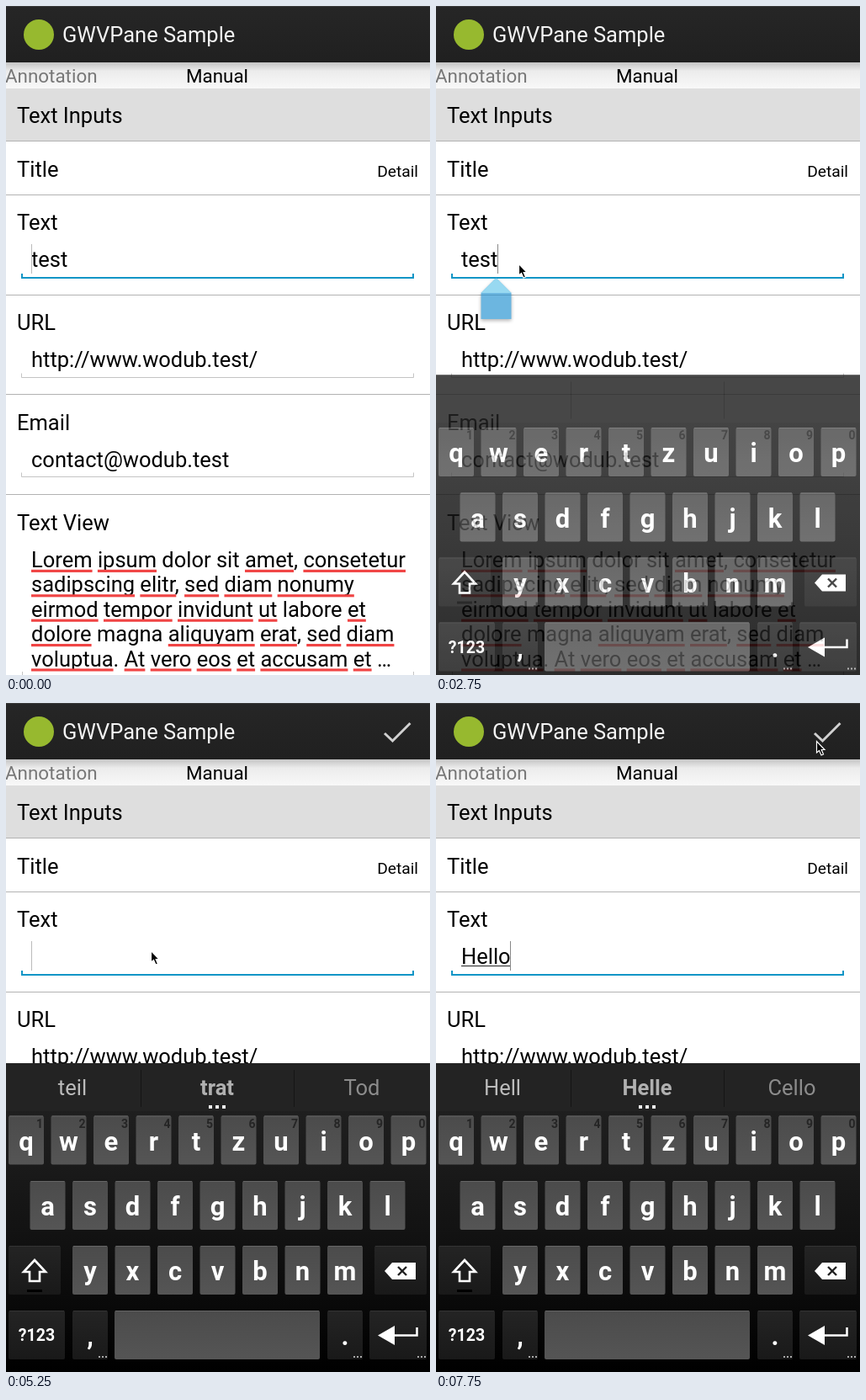
Animation of 504 by 795 pixels, one loop 8 s. Source, as an HTML page with a canvas:

```html
<!DOCTYPE html>
<html lang="en">
<head>
<meta charset="utf-8">
<title>Form demo</title>
<style>
  html, body { margin: 0; width: 100%; height: 100%; overflow: hidden; background: #fff; }
  canvas { display: block; }
</style>
</head>
<body>
<canvas id="stage" width="504" height="795"></canvas>
<script>
const LOOP = 8000;
const FONT_SIZE = 25.5;
const stage = document.getElementById('stage');
const overlay = stage.cloneNode();
const overlayCtx = overlay.getContext('2d');
const stageCtx = stage.getContext('2d');
let ctx = stageCtx;

// Each step changes part of the state at the given time.
const steps = [
  [0, { text: 'test', caret: 0, composing: false, pointer: null, keyboard: 0, handle: 0, words: null, check: false }],
  [500, { caret: null }],
  [750, { pointer: [406, 89] }],
  [1000, { pointer: [373, 258], caret: 0 }],
  [1250, { pointer: [215, 300] }],
  [1500, { pointer: [104, 307], caret: null }],
  [2000, { pointer: [102, 306], caret: 0 }],
  [2250, { pointer: [100, 306] }],
  [2500, { caret: null }],
  [2750, { pointer: [98, 306], caret: 4, keyboard: 0.83, handle: 0.65 }],
  [3000, { pointer: [93, 305], keyboard: 1, handle: 1 }],
  [3250, { text: 'tes', caret: 3, handle: 0 }],
  [3500, { text: 'te', caret: 2 }],
  [3750, { text: 't', caret: 1, composing: true, words: ['teil', 'trat', 'Tod'] }],
  [4250, { text: '', caret: 0, composing: false, pointer: [120, 302] }],
  [4500, { check: true, pointer: [163, 296] }],
  [4750, { caret: null, pointer: [172, 294] }],
  [5250, { caret: 0 }],
  [5750, { text: 'H', caret: 1, words: null }],
  [6000, { text: 'He', caret: 2 }],
  [6250, { text: 'Hell', caret: 4 }],
  [6500, { text: 'Hello', caret: 5 }],
  [6750, { composing: true, words: ['Hell', 'Helle', 'Cello'] }],
  [7250, { caret: null, pointer: [215, 250] }],
  [7500, { pointer: [390, 105] }],
  [7750, { caret: 5, pointer: [452, 45] }]
];

const paragraph = [
  'Lorem ipsum dolor sit amet, consetetur',
  'sadipscing elitr, sed diam nonumy',
  'eirmod tempor invidunt ut labore et',
  'dolore magna aliquyam erat, sed diam',
  'voluptua. At vero eos et accusam et …'
];
const knownWords = ['dolor', 'sit', 'labore', 'magna', '…'];

function setFont(size, weight = 400) {
  ctx.font = `${weight} ${size}px Roboto, sans-serif`;
}

function label(text, x, y, { size = FONT_SIZE, color = '#000', weight = 400, align = 'left' } = {}) {
  setFont(size, weight);
  ctx.fillStyle = color;
  ctx.textAlign = align;
  ctx.fillText(text, x, y);
}

function rect(x, y, w, h, color) {
  ctx.fillStyle = color;
  ctx.fillRect(x, y, w, h);
}

function path(points, { fill, stroke, width = 1, closed = true }) {
  ctx.beginPath();
  points.forEach(([x, y]) => ctx.lineTo(x, y));
  if (closed) ctx.closePath();
  if (fill) {
    ctx.fillStyle = fill;
    ctx.fill();
  }
  if (stroke) {
    ctx.strokeStyle = stroke;
    ctx.lineWidth = width;
    ctx.stroke();
  }
}

function vertical(y0, y1, ...colors) {
  const gradient = ctx.createLinearGradient(0, y0, 0, y1);
  colors.forEach((color, i) => gradient.addColorStop(i / (colors.length - 1), color));
  return gradient;
}

function textWidth(text) {
  setFont(FONT_SIZE);
  return ctx.measureText(text).width;
}

// Draws a group of shapes and fades it as one picture.
function fadeGroup(alpha, drawGroup) {
  ctx = overlayCtx;
  ctx.clearRect(0, 0, 504, 795);
  ctx.save();
  drawGroup();
  ctx.restore();
  ctx = stageCtx;
  ctx.globalAlpha = alpha;
  ctx.drawImage(overlay, 0, 0);
  ctx.globalAlpha = 1;
}

function drawHeader(check) {
  rect(0, 0, 504, 67, vertical(0, 67, '#262626', '#202020'));
  rect(0, 0, 504, 1, '#3a3a3a');
  ctx.fillStyle = '#97b92f';
  ctx.beginPath();
  ctx.arc(39, 34, 18, 0, Math.PI * 2);
  ctx.fill();
  label('GWVPane Sample', 67, 43, { color: '#f3f3f3' });
  if (check) {
    path([[450, 36], [459.5, 45], [480.5, 24]], { stroke: '#d0d0d0', width: 3, closed: false });
  }
  rect(0, 67, 504, 31, vertical(67, 98, '#c4c4c4', '#ececec', '#f2f2f2', '#f8f8f8'));
  label('Annotation', -1, 91, { size: 22.4, color: '#777' });
  label('Manual', 214, 91, { size: 22.4 });
}

function fieldLine(y, color, width) {
  const edge = width / 2;
  path([[18 + edge, y - 5], [18 + edge, y], [485 - edge, y], [485 - edge, y - 5]],
    { stroke: color, width, closed: false });
}

function drawParagraph() {
  paragraph.forEach((line, i) => {
    const y = 667 + i * 29.4;
    label(line, 30, y);
    let x = 30;
    for (const word of line.split(' ')) {
      const bare = word.replace(/[.,]/g, '');
      if (!knownWords.includes(bare)) rect(x, y + 2.8, textWidth(bare), 3.15, '#f04444');
      x += textWidth(word + ' ');
    }
  });
}

function drawForm({ text, caret, composing }) {
  rect(0, 98, 504, 63, '#dedede');
  for (const y of [160, 224, 343, 461, 580]) rect(0, y, 504, 1, '#b2b2b2');
  label('Text Inputs', 13, 139);
  label('Title', 13, 203);
  label('Detail', 490, 203, { size: 19.2, align: 'right' });
  label('Text', 13, 266);
  label('URL', 13, 385);
  label('http://www.wodub.test/', 30, 429);
  label('Email', 13, 504);
  label('contact@wodub.test', 30, 548);
  label('Text View', 13, 623);
  fieldLine(323, '#1295c6', 2);
  fieldLine(441.5, '#c4c4c4', 1);
  fieldLine(559.5, '#c4c4c4', 1);
  drawParagraph();
  rect(19, 791, 1, 4, '#c4c4c4');
  rect(484, 791, 1, 4, '#c4c4c4');

  label(text, 30, 310);
  if (composing) rect(30, 312, textWidth(text), 1, '#222');
  if (caret !== null) {
    rect(Math.floor(30 + textWidth(text.slice(0, caret))), 283, 1, 35, caret ? '#888' : '#bbb');
  }
}

function drawHandle() {
  ctx.shadowColor = 'rgba(0,0,0,.45)';
  ctx.shadowBlur = 4;
  ctx.shadowOffsetY = 2;
  path([[71.5, 323], [89.5, 341], [89.5, 372], [53.5, 372], [53.5, 341]], { fill: '#1f90d0' });
  ctx.shadowColor = 'transparent';
  path([[71.5, 323], [89.5, 341], [53.5, 341]], { fill: '#62c5ea' });
}

function key(x, y, w, text, { dark = false, size = 31, hint, more = false } = {}) {
  ctx.fillStyle = dark ? vertical(y, y + 58, '#242424', '#191919') : vertical(y, y + 58, '#4b4b4b', '#555');
  ctx.beginPath();
  ctx.roundRect(x, y, w, 58, 2);
  ctx.fill();
  rect(x + 1, y, w - 2, 1, dark ? '#343434' : '#666');
  const baseline = size < 31 ? y + 36 : y + 41;
  label(text, x + w / 2, baseline, { size, weight: 700, color: '#fff', align: 'center' });
  if (hint) label(hint, x + w - 5, y + 14, { size: 14, weight: 700, color: '#252525', align: 'center' });
  if (more) dots(x + w - 11, y + 54, 2, 4, '#aaa');
}

function keyRow(letters, x, y, hints = '') {
  [...letters].forEach((letter, i) => key(x + i * 50.5, y, 42, letter, { hint: hints[i] }));
}

function dots(x, y, size, pitch, color) {
  for (let i = 0; i < 3; i++) rect(x + i * pitch, y, size, size, color);
}

function drawIcons() {
  path([[34, 662], [47, 676], [40, 676], [40, 687], [28, 687], [28, 676], [21, 676]],
    { stroke: '#fff', width: 2.6 });
  rect(25, 697, 18, 3, '#000');
  path([[450, 675], [459, 665], [487, 665], [487, 685], [459, 685]], { fill: '#fff' });
  for (const side of [-5, 5]) {
    path([[471 - side, 670], [471 + side, 680]], { stroke: '#222', width: 2.4, closed: false });
  }
  path([[488.5, 742], [488.5, 751.5], [460, 751.5]], { stroke: '#fff', width: 2.5, closed: false });
  path([[442, 751.5], [462, 740], [462, 763]], { fill: '#fff' });
}

function drawKeyboard(offset, words) {
  ctx.translate(0, offset);
  rect(0, 428, 504, 367, vertical(428, 795, '#232323', '#1a1a1a', '#0e0e0e', '#000'));
  rect(0, 428, 504, 57, '#232323');
  for (const x of [160, 342]) rect(x, 436, 1, 44, '#151515');
  if (words) {
    words.forEach((word, i) => label(word, 79 + i * 172, 466, {
      align: 'center',
      weight: i === 1 ? 700 : 400,
      color: ['#bbb', '#b0b0b0', '#8c8c8c'][i]
    }));
    dots(241, 478, 4, 8, '#eee');
  }
  keyRow('qwertzuiop', 3, 490.5, '1234567890');
  keyRow('asdfghjkl', 28.5, 568);
  key(3, 645, 62, '', { dark: true });
  keyRow('yxcvbnm', 79, 645);
  key(438, 645, 62, '', { dark: true });
  key(3, 722, 67, '?123', { dark: true, size: 19.5 });
  key(79, 722, 42, ',', { dark: true, more: true });
  key(129, 722, 244, '');
  key(382, 722, 42, '.', { dark: true, more: true });
  key(432, 722, 68, '', { dark: true, more: true });
  drawIcons();
}

function drawPointer([x, y]) {
  ctx.save();
  ctx.translate(x, y);
  path([[0.5, 0.5], [0.5, 14], [3.5, 11.5], [6, 17], [8.5, 16], [6.2, 10.5], [10, 10.5]],
    { fill: '#000', stroke: '#fff', width: 1.2 });
  ctx.restore();
}

function draw(time) {
  const state = {};
  for (const [start, change] of steps) {
    if (start <= time) Object.assign(state, change);
  }
  const { keyboard, handle, words, pointer, check } = state;
  rect(0, 0, 504, 795, '#fff');
  drawHeader(check);
  drawForm(state);
  if (keyboard) fadeGroup(keyboard, () => drawKeyboard(keyboard < 1 ? 10.5 : 0, words));
  if (handle) fadeGroup(handle, drawHandle);
  if (pointer) drawPointer(pointer);
}

const began = performance.now();
function tick() {
  draw((performance.now() - began) % LOOP);
  requestAnimationFrame(tick);
}
tick();
</script>
</body>
</html>
```
